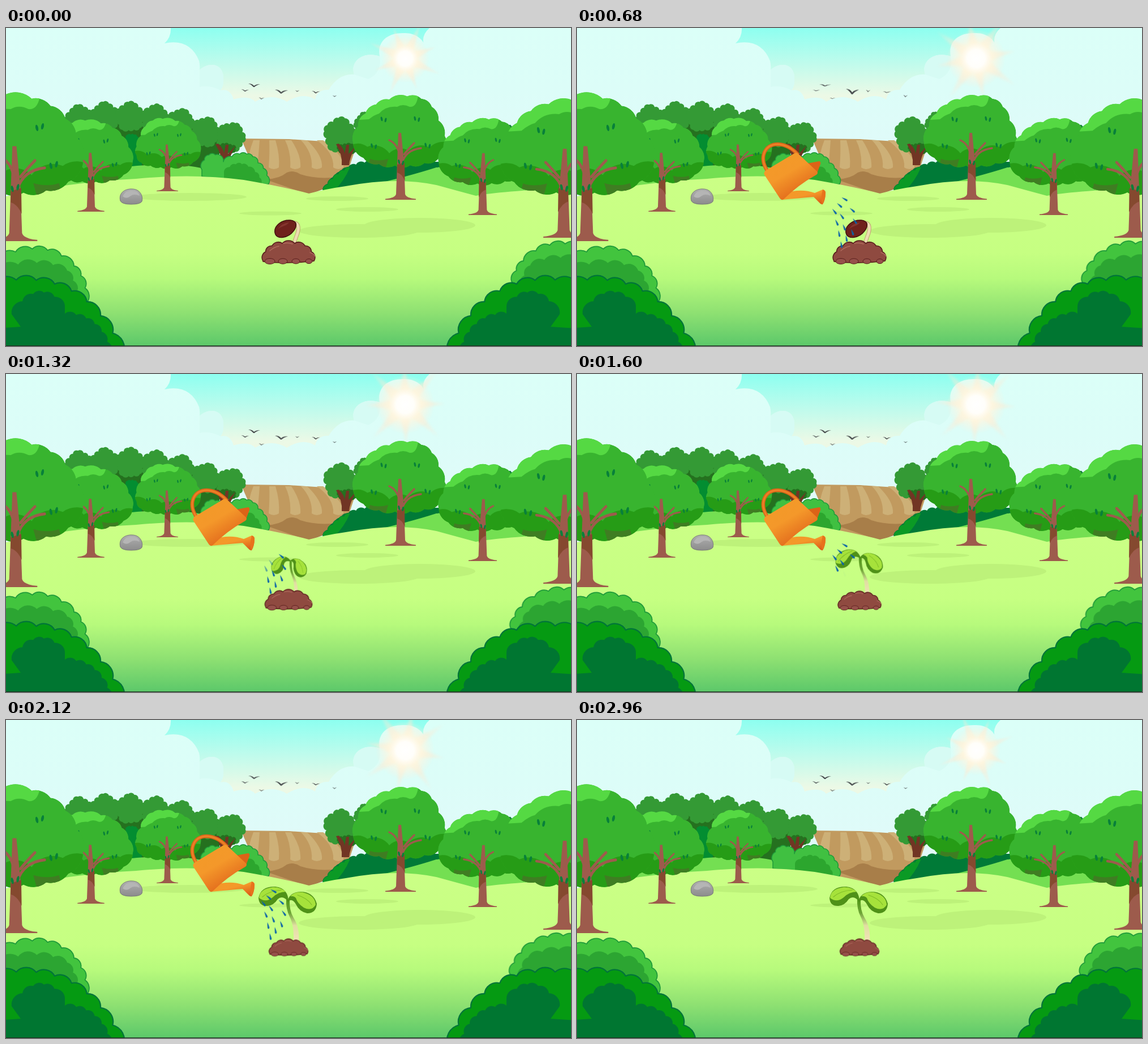
Animation of 998x561 px, one loop 3 s. Source, as an HTML page:

```html
<!DOCTYPE html>
<html lang="en">
<head>
<meta charset="utf-8">
<title>Growing sprout</title>
<style>
html, body { margin: 0; width: 100%; height: 100%; overflow: hidden; background: #dcfef8; }
svg { display: block; width: 100vw; height: 100vh; }
.can, .seed, .sprout, .mound, .stem, .node, .leafL, .leafR, .drop, .rays, .glow, .drift { animation: 3s linear infinite; }
.can { animation-name: can; }
.seed { animation-name: seed; }
.sprout { animation-name: sprout; }
.mound { animation-name: mound; transform-origin: 499px 417px; }
.stem { animation-name: stem; transform-origin: 512px 392px; }
.node { animation-name: node; }
.leafL, .leafR { transform-origin: 499px 318px; }
.leafL { animation-name: leaf; --turn: -1deg; }
.leafR { animation-name: leaf; --turn: 1deg; }
.drop { opacity: 0; animation-name: drop; }
.rays, .glow { transform-origin: 705px 54px; }
.rays { animation-name: spin; filter: blur(2px); }
.glow { animation-name: glow; }
.drift { animation-name: drift; }
.flap { animation: flap .5s ease-in-out infinite; }
@keyframes can { 0%, 6% { opacity: 0 } 9%, 87% { opacity: 1 } 90%, 100% { opacity: 0 } }
@keyframes seed { 0%, 30% { opacity: 1 } 36%, 100% { opacity: 0 } }
@keyframes sprout { 0%, 30% { opacity: 0 } 36%, 100% { opacity: 1 } }
@keyframes mound { 0%, 30% { transform: scale(1) } 63%, 100% { transform: scale(.735) } }
@keyframes stem { 0%, 30% { transform: scale(.4, .67) } 63%, 100% { transform: scale(1, 1) } }
@keyframes node { 0%, 30% { transform: translate(7px, 20px) } 63%, 100% { transform: translate(0, 0) } }
@keyframes leaf {
  0%, 30% { transform: rotate(calc(var(--turn) * 58)) scale(.5) }
  63%, 100% { transform: rotate(0deg) scale(1) }
}
@keyframes drop {
  0%, 13% { opacity: 0 } 14%, 41% { opacity: 1 } 42%, 49% { opacity: 0 }
  50%, 72% { opacity: 1 } 73%, 100% { opacity: 0 }
}
@keyframes spin { to { transform: rotate(45deg) } }
@keyframes glow { 0%, 100% { transform: scale(.82) } 10%, 85% { transform: scale(1) } }
@keyframes drift { from { transform: translateX(3px) } to { transform: translateX(-2px) } }
@keyframes flap { 0%, 18%, 56%, 100% { transform: scaleY(1) } 36% { transform: scaleY(var(--dip)) } }
</style>
</head>
<body>
<svg viewBox="0 0 998 561" preserveAspectRatio="none">
  <defs>
    <linearGradient id="sky" x2="0" y2="1">
      <stop offset="0" stop-color="#8dfff0"/><stop offset=".45" stop-color="#c0fbec"/>
      <stop offset=".85" stop-color="#ecf9e6"/><stop offset="1" stop-color="#edf8e4"/>
    </linearGradient>
    <linearGradient id="cloud" gradientUnits="userSpaceOnUse" x2="0" y2="220">
      <stop offset="0" stop-color="#dbfff8"/><stop offset=".5" stop-color="#dcfdf8"/>
      <stop offset="1" stop-color="#e0faf9"/>
    </linearGradient>
    <linearGradient id="grass" gradientUnits="userSpaceOnUse" y1="262" x2="0" y2="561">
      <stop offset="0" stop-color="#cbff86"/><stop offset=".45" stop-color="#c6ff82"/>
      <stop offset=".6" stop-color="#b7fa7c"/><stop offset=".8" stop-color="#8fe172"/>
      <stop offset="1" stop-color="#5cc86a"/>
    </linearGradient>
    <radialGradient id="sun">
      <stop offset="0" stop-color="#fff"/><stop offset=".3" stop-color="#fffefa"/>
      <stop offset=".55" stop-color="#fff6e0" stop-opacity=".8"/>
      <stop offset="1" stop-color="#fdf2e0" stop-opacity="0"/>
    </radialGradient>
    <radialGradient id="ray" gradientUnits="userSpaceOnUse" cx="705" cy="54" r="85">
      <stop offset=".2" stop-color="#ffedc8" stop-opacity=".8"/>
      <stop offset="1" stop-color="#fbe9dc" stop-opacity=".15"/>
    </radialGradient>
    <linearGradient id="metal" x1=".15" y1=".1" x2=".75" y2="1">
      <stop offset="0" stop-color="#f39a28"/><stop offset=".4" stop-color="#f4982a"/>
      <stop offset="1" stop-color="#dd5c18"/>
    </linearGradient>
    <linearGradient id="stalk" gradientUnits="userSpaceOnUse" y1="318" x2="0" y2="392">
      <stop offset="0" stop-color="#559a1b"/><stop offset=".3" stop-color="#6da435"/>
      <stop offset=".6" stop-color="#e0dfa0"/><stop offset="1" stop-color="#f2e3b9"/>
    </linearGradient>
    <linearGradient id="stone" x2="0" y2="1">
      <stop offset="0" stop-color="#b0b0b0"/><stop offset="1" stop-color="#8c8c8c"/>
    </linearGradient>
    <clipPath id="crown"><path id="crownEdge"/></clipPath>
  </defs>
  <g id="scene"></g>
</svg>
<script>
const path = (d, fill, extra = '') => `<path d="${d}" fill="${fill}" ${extra}/>`;
const line = (d, color, w) => path(d, 'none', `stroke="${color}" stroke-width="${w}" stroke-linecap="round"`);
const oval = (x, y, rx, ry, fill, extra = '') =>
  `<ellipse cx="${x}" cy="${y}" rx="${rx}" ry="${ry}" fill="${fill}" ${extra}/>`;
const group = (attrs, ...parts) => `<g ${attrs}>${parts.join('')}</g>`;
const edge = (color, w) => `stroke="${color}" stroke-width="${w}" stroke-linejoin="round"`;
const flip = on => `transform="scale(${on ? -1 : 1} 1)"`;
const repeat = (n, make) => Array.from({ length: n }, (_, i) => make(i)).join('');

// n rounded bumps along a quadratic curve; k is bump radius over bump width.
function lobes(x0, y0, cx, cy, x1, y1, n, k = .66) {
  let px = x0, py = y0;
  return `L${x0} ${y0}` + repeat(n, i => {
    const t = (i + 1) / n, s = 1 - t;
    const x = s * s * x0 + 2 * s * t * cx + t * t * x1;
    const y = s * s * y0 + 2 * s * t * cy + t * t * y1;
    const r = Math.hypot(x - px, y - py) * k;
    [px, py] = [x, y];
    return `A${r} ${r} 0 0 1 ${x} ${y}`;
  });
}

function leafy(x, y, rx, ry, fill, n = 15) {
  let prev;
  const d = repeat(n + 1, i => {
    const a = i % n / n * Math.PI * 2, k = .92 + .08 * Math.sin(i % n * 4.3 + x);
    const p = [x + rx * k * Math.cos(a), y + ry * k * Math.sin(a)];
    const r = prev && Math.hypot(p[0] - prev[0], p[1] - prev[1]) * .6;
    prev = p;
    return i ? `A${r} ${r} 0 0 1 ${p}` : 'M' + p;
  });
  return path(d, fill);
}

function sky() {
  const clouds =
    path('M0 0H291Q292 16 280 27Q325 18 341 58Q343 66 342 74C360 58 384 64 384 88Q385 102 379 110' +
      'Q396 106 402 126Q430 118 440 130Q470 114 496 130Q525 112 546 126Q550 108 570 109Q588 80 615 82' +
      'C607 58 632 40 660 50C655 22 676 8 703 9C724 8 739 22 739 32Q732 14 748 0H998V270H0Z', 'url(#cloud)') +
    path('M342 74C360 58 384 64 384 88Q385 102 379 110Q360 100 342 104Z', '#d6fbf4') +
    path('M615 82C607 58 632 40 660 50Q665 78 640 90Z', '#d6fbf4');
  const rays = repeat(8, i =>
    path(`M693 54L705 ${i % 2 ? -16 : -30}L717 54Z`, 'url(#ray)', `transform="rotate(${i * 45 + 24} 705 54)"`));
  return '<rect width="998" height="140" fill="url(#sky)"/>' + clouds +
    group('class="glow"', group('class="rays"', rays), oval(705, 54, 52, 52, 'url(#sun)'));
}

const birds = () => [[438, 101, 20], [486, 112, 22], [422, 110, 13], [514, 111, 8], [547, 113, 14], [580, 120, 8], [451, 124, 10]]
  .map(([x, y, w], i) => group(`transform="translate(${x} ${y}) scale(${w / 20})"`,
    group(`class="flap" style="--dip:${i % 2 ? 1.4 : .6}"`,
      path('M-10 -3Q-3 -3 0 1Q4 -2 11 -2Q4 0 1 3Q-1 4 -3 1Q-6 -2 -10 -3Z', '#44484a')))).join('');

function field() {
  const stripes = repeat(5, i => {
    const top = 437 + 28 * i, low = 426 + 38 * i;
    return path(`M${top} 198H${top + 11}Q${low + 20} 225 ${low + 18} 246Q${low + 9} 252 ${low} 246Q${low + 2} 220 ${top} 198Z`, '#cdb077');
  });
  return path('M415 195L500 196L620 204L600 265L535 294L450 275Z', '#c19a5f') + stripes +
    path('M455 266Q480 268 496 255Q508 250 520 258Q545 266 575 264L585 275L535 294Z', '#a87e49');
}

function forest() {
  const dark = '#25711f', green = '#349a35';
  const trunk = x => path(`M${x - 5} 242Q${x - 3} 225 ${x - 15} 205L${x - 10} 204Q${x} 214 ${x} 222L${x + 3} 206L${x + 8} 206L${x + 7} 222L${x + 20} 208Q${x + 9} 228 ${x + 8} 242Z`, '#713524');
  const row = repeat(7, i => {
    const x = 130 + 44.5 * i;
    return leafy(x, 162 - 6 * Math.sin(i) + Math.max(0, x - 300) * .3, 26, 27, green);
  });
  return path('M105 165L250 150L345 170L378 200L375 262H150Z', dark) + row +
    leafy(388, 213, 20, 9, dark) + trunk(385) +
    leafy(222, 207, 14, 22, '#038d31') + path('M208 208H240V250H208Z', '#038d31') +
    leafy(633, 172, 18, 24, green) + leafy(590, 189, 29, 32, green) +
    leafy(603, 213, 20, 9, dark) + trunk(598) + leafy(884, 182, 15, 13, '#0b7d36');
}

function midground() {
  const back = '#74df52';
  return path('M0 302L60 280Q180 238 300 241Q370 246 420 274V310H0Z', back) +
    path('M346 262' + lobes(346, 250, 352, 207, 384, 232, 4) + lobes(384, 236, 424, 208, 445, 236, 5) +
      lobes(445, 238, 462, 250, 463, 276, 3) + 'Z', '#40c041', edge('#1f9a3a', 1.5)) +
    path('M385 272' + lobes(385, 255, 410, 225, 440, 254, 5) + lobes(440, 254, 450, 262, 450, 276, 2) + 'Z', '#2ca62e') +
    path('M562 287' + lobes(562, 287, 590, 238, 650, 236, 7) + 'H770V280Z', '#007a37') +
    path('M560 287' + lobes(560, 287, 580, 256, 608, 246, 5) + 'Q598 270 580 287Z', '#0b9a25', edge('#007a37', 1)) +
    path('M640 278Q710 262 760 246Q830 240 998 270V310H640Z', back) +
    path('M0 297Q110 272 230 266Q330 256 420 268Q490 280 535 292Q565 284 600 279Q690 262 760 277Q800 288 830 296Q870 288 998 282V561H0Z', 'url(#grass)') +
    [[325, 298, 100, 7], [585, 301, 55, 4], [467, 327, 55, 3.5], [638, 320, 55, 4], [623, 358, 106, 12], [731, 348, 98, 13]]
      .map(a => oval(...a, '#bdf27a')).join('');
}

const crown = 'M-84 -100' + lobes(-84, -100, -72, -166, -20, -177, 4, .9) + lobes(-20, -177, 50, -198, 67, -140, 4, .9) +
  lobes(67, -140, 92, -96, 66, -72, 3, .9) + lobes(66, -72, 20, -54, -38, -63, 4, .9) +
  lobes(-38, -63, -70, -66, -84, -100, 2, .9) + 'Z';

function tree(x, y, s, flipCrown, flipTrunk) {
  const leaves = repeat(10, i => {
    const a = 4.07 + (i >> 1) * 1.257, side = i % 2 * 2 - 1;
    const lx = 50 * Math.cos(a) + 3.5 * side, ly = -108 + 42 * Math.sin(a) + side;
    return oval(lx, ly, 1.7, 4, '#08803a', `transform="rotate(${12 * side} ${lx} ${ly})"`);
  });
  return group(`transform="translate(${x} ${y}) scale(${s})"`,
    group(flip(flipCrown), group('clip-path="url(#crown)"',
      path(crown, '#38b42f'),
      path('M-95 -40' + lobes(-95, -92, -60, -100, -20, -82, 2, .8) + lobes(-20, -82, 30, -88, 90, -98, 3, .8) + 'V-40Z', '#269c16'),
      path('M-54 -72Q-40 -67 -22 -72L-28 -50H-60Z', '#3f7d22'),
      group(flip(flipCrown), path('M-90 -140L-56 -142' + 'Q-46 -150 -38 -152Q-26 -166 -6 -164Q4 -170 16 -164Q32 -162 32 -200H-90Z', '#55d943')))),
    group(flip(flipTrunk),
      path('M-27 0V-1.5Q-10 -3 -8 -10L-6 -66L-4 -118H1L6 -66L8 -10Q10 -3 27 -1.5V0Z', '#9d5b4c'),
      line('M2 -64Q9 -88 36 -91M6 -80Q16 -92 24 -100', '#9d5b4c', 3.5),
      line('M-2 -80Q-6 -99 -20 -105', '#9d5b4c', 3.5),
      path('M-6 -62L7 -66L7.5 -34Q2 -46 -6 -48Z', '#85492f')),
    group(flip(flipCrown), leaves));
}

const trees = () => tree(285, 288, .7, true, false) + tree(150, 324, .88, true, false) + tree(17, 376, 1.42, true, false) +
  tree(697, 303, 1, false, false) + tree(842, 330, .925, false, true) + tree(985, 370, 1.33, false, true);

const rock = () => path('M202 305C198 290 212 283 223 284C236 284 243 296 240 306Q237 311 221 311Q205 311 202 305Z', 'url(#stone)', edge('#777', 1)) +
  path('M206 297Q211 286 222 287Q234 287 236 296Q226 291 219 297Q213 302 206 297Z', '#b5b5b5');

const can = () => {
  const handle = 'M335 250C322 228 331 205 355 205Q374 206 389 222';
  return group('class="can"',
    line(handle, '#d9661a', 6.5), line(handle, '#ee8026', 3),
    path('M396 241L428 235Q431 236 430 240L424 256Q410 268 396 262Z', '#dc6317'),
    path('M365 292Q395 282 420 291L434 285Q439 286 439 291Q439 303 434 311Q431 312 428 308L418 298Q395 300 362 303Z', 'url(#metal)'),
    path('M434 285Q440 286 439 293Q438 305 433 311Q430 300 434 285Z', '#e8721c'),
    path('M331 259Q329 254 334 251L384 221Q389 219 392 223L424 253Q427 257 421 260Q392 276 365 302Q361 305 358 300Z', 'url(#metal)'));
};

const seed = () => {
  const stalk = 'M511 344Q519 347 515 362Q512 370 508 382';
  return group('class="seed"', line(stalk, '#bfa06f', 7), line(stalk, '#ecdcb0', 5),
    path('M475 361C473 348 488 338 502 339C514 340 515 349 508 358C500 369 478 376 475 361Z', '#6f211c', edge('#43100f', 1.5)),
    path('M480 355Q487 344 500 343Q496 348 489 350Q483 352 480 355Z', '#84352e'));
};

const sprout = () => group('class="sprout"',
  group('class="stem"', path('M495 316Q494 333 501 347Q509 362 508 392H517Q519 366 508 349Q500 336 501 316Z', 'url(#stalk)')),
  group('class="node"',
    group('class="leafL"',
      path('M499 321Q499 297 476 294Q450 293 446 314Q447 329 462 328Q473 327 480 316Q489 308 499 321Z', '#4f9118'),
      path('M494 303Q484 294 471 295Q448 298 447 314Q459 323 471 313Q481 303 494 303Z', '#a6e23b'),
      line('M453 312Q466 301 486 300', '#7fbd27', 1.2)),
    group('class="leafR"',
      path('M497 321Q500 304 520 303Q543 303 549 324Q548 341 532 341Q518 338 512 325Q505 313 497 321Z', '#4f9118'),
      path('M502 311Q510 302 524 304Q546 309 547 326Q540 338 526 331Q515 324 512 314Q508 310 502 311Z', '#a6e23b'),
      line('M515 309Q532 314 540 326', '#7fbd27', 1.2))));

const mound = () => group('class="mound"',
  path('M454 412' + lobes(454, 411, 456, 382, 488, 380, 3) + lobes(488, 380, 499, 379, 510, 380, 1) +
    lobes(510, 380, 542, 382, 544, 411, 3) + 'Q499 417 454 412Z', '#8f4a40', edge('#571d1b', 1.6)),
  repeat(4, i => oval(466 + i * 23, 411.5, 9 - i, 5 - i * .3, '#96514a', edge('#571d1b', 1))),
  line('M466 393Q474 386 482 385M490 380Q499 378 506 381M537 396Q544 398 546 403', '#b06c5e', 1.4));

// Three curved streams of four drops; a diagonal wave shows and hides them.
const rain = () => repeat(12, n => {
  const j = n % 3, i = n / 3 | 0;
  const x = 455 + 9 * j + 4 * i + j * (j - 1) / 2 * (14 * i - 4.5 * i * i);
  const y = 324 - 11 * j + 19.5 * i;
  const tilt = -Math.max(8, 58 - (y - 300) * .75 + (x - 470) * .3);
  return path('M-.6 -7.5Q2.4 1 2 5Q0 8 -1.8 5Q-1.6 0 -.6 -7.5Z', '#0862a8',
    `class="drop" style="animation-delay:${((x + y - 770) * 2.4).toFixed()}ms" transform="translate(${x} ${y}) rotate(${tilt}) scale(.85)"`);
});

const backBush = () =>
  path('M-15 520' + lobes(-15, 408, 68, 366, 120, 420, 5) + lobes(120, 420, 142, 442, 142, 485, 3) + 'L120 520Z', '#42c43e', edge('#1f9a3a', 1.8)) +
  path('M-15 520' + lobes(-15, 426, 62, 402, 108, 428, 4) + lobes(108, 428, 126, 452, 128, 490, 3) + 'L110 520Z', '#2ca532');

const frontBush = () =>
  path('M-20 575' + lobes(-20, 450, 138, 416, 207, 575, 8) + 'Z', '#059a12', edge('#00743a', 2.2)) +
  path('M-20 575V530L26 527' + lobes(10, 505, 58, 435, 104, 492, 5) + lobes(104, 504, 168, 505, 186, 575, 6) + 'Z', '#007631');

document.getElementById('crownEdge').setAttribute('d', crown);
document.getElementById('scene').innerHTML = [
  sky(), birds(), field(), forest(), midground(), trees(), rock(),
  seed(), sprout(), mound(), can(), rain(),
  backBush(), frontBush(),
  group('class="drift"', group('transform="translate(1031 -9) scale(-1 1)"', backBush())),
  group('transform="translate(988 0) scale(-1 1)"', frontBush()),
  '<rect y="560" width="998" height="1" fill="#16301c"/>'
].join('');
</script>
</body>
</html>
```
